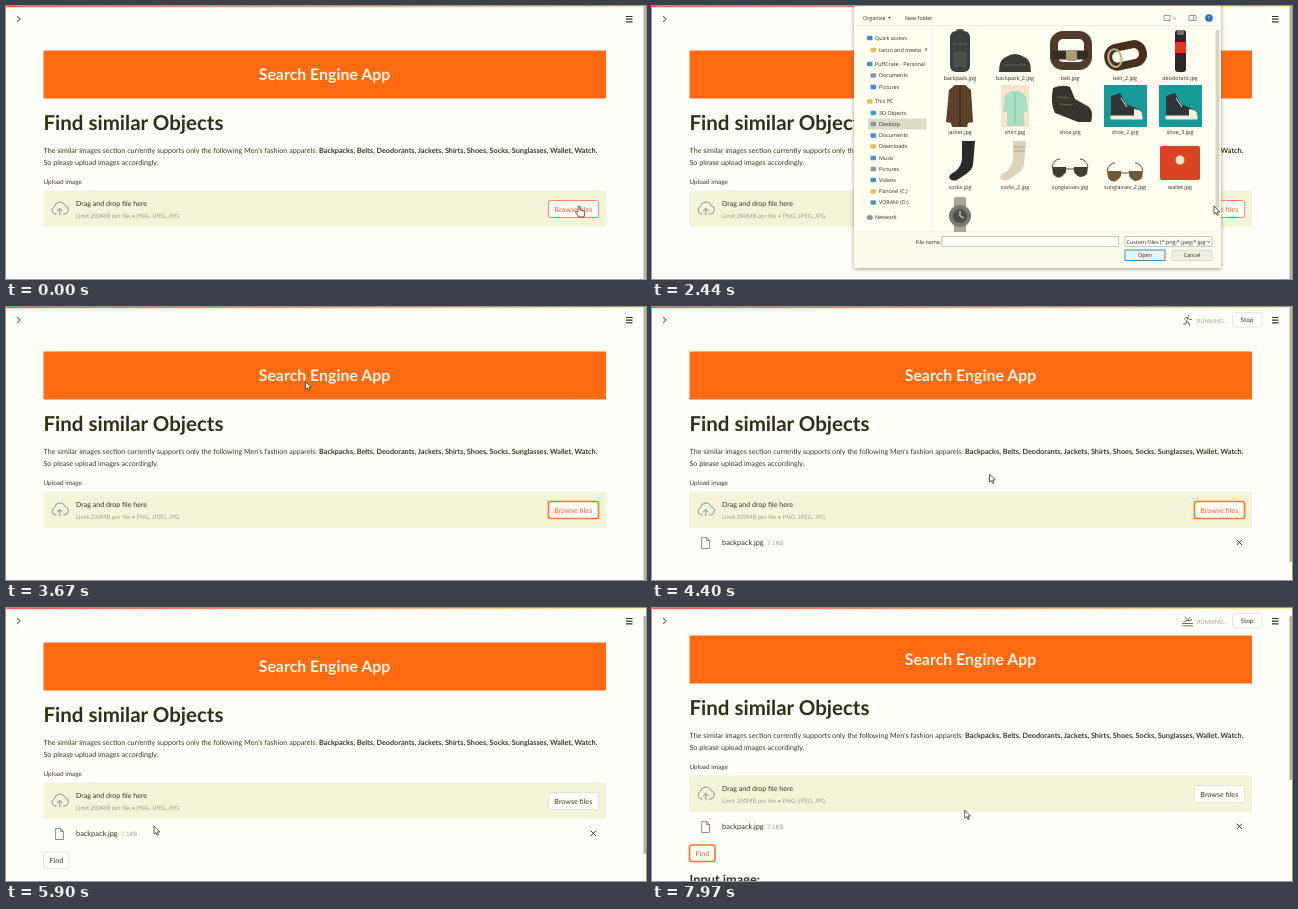
Recreate the animation shown at these times as an HTML page. Size 640 px wide and 273 px high, loop 8000 ms.

```html
<!DOCTYPE html>
<html lang="en">
<head>
<meta charset="utf-8">
<title>Search Engine App</title>
<style>
html, body { margin: 0; height: 100%; overflow: hidden; background: #fffffa; }
svg { display: block; width: 100vw; height: 100vh; }
text { font-family: Lato, sans-serif; font-size: 7.15px; fill: #37381f; text-rendering: geometricPrecision; }
.bold { font-weight: 700; font-size: 7.28px; }
.mid { text-anchor: middle; }
.small { font-size: 6px; fill: #a3a48c; }
.line { fill: none; stroke: #85958f; stroke-width: 1; stroke-linejoin: round; stroke-linecap: round; }
.btn rect { fill: #fffffa; stroke: #e2e2cc; stroke-width: .8; }
.btn.hover rect { stroke: #ff6a4c; }
.btn.focus rect { stroke: #ff7a30; stroke-width: 1.7; }
.btn.hover text, .btn.focus text { fill: #ff5a28; }
.btn.active rect { fill: #ff4b22; stroke: #ff8a5c; stroke-width: 1.6; }
.btn.active text { fill: #fff; }
#dialog text { font: 5.4px "Open Sans", "Noto Sans", sans-serif; fill: #2b2b20; }
.field { fill: #fffffa; stroke: #a9a99a; stroke-width: .6; }
</style>
</head>
<body>
<svg viewBox="0 0 640 273" preserveAspectRatio="none">
  <defs>
    <linearGradient id="strip"><stop stop-color="#ff5a50"/><stop offset=".5" stop-color="#ffa070"/><stop offset="1" stop-color="#fff3a0"/></linearGradient>
    <filter id="shadow" x="-10%" y="-10%" width="120%" height="120%"><feDropShadow dx="0" dy="1" stdDeviation="2" flood-color="#55553a" flood-opacity=".6"/></filter>
  </defs>
  <rect width="640" height="273" fill="#fffffa"/>

  <g id="page">
    <rect x="37.500" y="44.500" width="562.500" height="48" fill="#ff6a13"/>
    <text class="mid" x="318.500" y="74.200" style="font-size:15.9px;font-weight:700;fill:#fff8e6">Search Engine App</text>
    <text class="bold" x="37.500" y="123.500" style="font-size:20.5px;fill:#2f301a">Find similar Objects</text>
    <text x="37.500" y="147">The similar images section currently supports only the following Men's fashion apparels:</text>
    <text class="bold" x="313" y="147">Backpacks, Belts, Deodorants, Jackets, Shirts, Shoes, Socks, Sunglasses, Wallet, Watch.</text>
    <text x="37.500" y="159">So please upload images accordingly.</text>
    <text x="37.500" y="178" style="font-size:6.4px">Upload image</text>
    <rect x="37.500" y="184.500" width="562.500" height="36.800" rx="2" fill="#f3f4da"/>
    <path class="line" d="M50 208h-1a4 4 0 0 1-.5-7.500a5.500 5.500 0 0 1 10.500-1a4.300 4.300 0 0 1-.5 8.500h-1M53.800 209v-6.500m-2.500 2.500l2.500-2.500l2.500 2.500"/>
    <text x="70" y="200.300" style="font-size:7.05px">Drag and drop file here</text>
    <text class="small" x="70" y="212.200">Limit 200MB per file • PNG, JPEG, JPG</text>
    <g id="browse"><rect x="542.500" y="194.500" width="50" height="17" rx="2"/><text class="mid" x="567.300" y="205.600">Browse files</text></g>
    <g id="file">
      <path class="line" d="M50 230.500h4.500l3 3v8h-7.500zM54.500 230.500v3h3"/>
      <text x="70" y="238" style="font-size:7.4px">backpack.jpg</text>
      <text class="small" x="115" y="238">7.1KB</text>
      <path class="line" d="M585 233l4.800 4.800m0-4.800l-4.800 4.800" style="stroke:#37381f"/>
    </g>
    <g id="find"><rect x="37.500" y="254" width="25.500" height="16.500" rx="2"/><text class="mid" x="50.300" y="264.800">Find</text></g>
    <text id="result" class="bold" x="37.500" y="293" style="font-size:12.8px;fill:#2f301a">Input image:</text>
  </g>

  <rect width="640" height="26" fill="#fffffa"/>
  <rect width="640" height="1.200" fill="url(#strip)"/>
  <path class="line" d="M11.500 10.500l2.600 2.500l-2.600 2.500" style="stroke:#77786a;stroke-width:1.200"/>
  <path d="M620 10.500h6.500m-6.500 2.700h6.500m-6.500 2.700h6.500" stroke="#37381f" stroke-width="1.200"/>
  <g id="running">
    <path id="sport" class="line" style="stroke:#6f705c"/>
    <text class="small" x="545" y="16.300" style="font-size:5.600px">RUNNING...</text>
    <g class="btn"><rect x="580.500" y="5.700" width="29.500" height="14.300" rx="2"/><text class="mid" x="595" y="15.300" style="font-size:6.400px">Stop</text></g>
  </g>
  <rect id="thumb" x="637.500" width="2.500" rx="1" fill="#b0b0a4"/>
  <g id="dialog"></g>
  <g id="cursor" stroke="#33332a" stroke-width=".8" fill="#fffffa" stroke-linejoin="round">
    <path id="arrow" d="M0 0v8.200l1.900-1.700l1.300 2.900l1.300-.6l-1.300-2.800h2.600z"/>
    <path id="hand" d="M-1 .5q1-1 2 0v3.500l4 1q1 .3 .8 1.500l-.8 4.500h-5l-3.500-4.500q0-1.500 2.500-.5z"/>
  </g>
</svg>
<script>
const $ = id => document.getElementById(id);
const rect = (x, y, w, h, fill, rx = 0) => `<rect x="${x}" y="${y}" width="${w}" height="${h}" rx="${rx}" fill="${fill}"/>`;
const path = (d, fill, stroke = 'none', width = 1) => `<path d="${d}" fill="${fill}" stroke="${stroke}" stroke-width="${width}"/>`;
const label = (x, y, s, cls = '') => `<text x="${x}" y="${y}" class="${cls}">${s}</text>`;
const ring = (x, y, w, h, stroke, width) =>
  `<rect x="${x}" y="${y}" width="${w}" height="${h}" rx="9" fill="none" stroke="${stroke}" stroke-width="${width}"/>`;

// Thumbnails are drawn around their own centre.
const sneaker = rect(-21, -21, 43, 42, '#159a98') +
  path('M-14 -10l9 -3l6 11l12 5q5 2 4 7h-31z', '#30353a') + path('M-14 10h31v3h-31zM-4 -8l6 9', '#f2f0dc', '#f2f0dc') +
  path('M9 3l5 1q4 2 3 6h-8z', '#f2f0dc');
const glasses = (y, fill) =>
  path(`M-18 ${y}h14v5q-7 10-13 2zM4 ${y}h14l-1 7q-7 7-13-2z`, fill) + path(`M-18 ${y}q2-8 8-8M18 ${y}q-2-8-8-8M-4 ${y + 2}h8`, 'none', '#55503c');
const sock = fill => path('M-2 -20h13l-2 24q-1 5-7 9l-9 6q-6 2-8-3q1-3 7-6q6-6 6-13z', fill);
const items = [
  ['backpack', rect(-4, -22, 8, 5, '#555850', 2) + rect(-10, -20, 20, 41, '#3c403c', 6) + rect(-7, 1, 14, 15, '#4c504a', 3) + path('M-7 -7h14', 'none', '#66675a')],
  ['backpack_2', path('M-16 21q0-13 7-15q9-6 18 0q7 2 7 15z', '#3b3d36') + path('M-10 14h21', 'none', '#66644f')],
  ['belt', ring(-16, -16, 34, 31, '#4e3b2b', 8) + path('M-18 4h36', 'none', '#392c22', 9) + rect(-4, -1, 11, 11, '#a99c7c', 2)],
  ['belt_2', `<g transform="rotate(-12 0 4)">${ring(-17, -5, 35, 19, '#49301d', 8) + ring(-17, -4, 13, 18, '#c0b38a', 2)}</g>`],
  ['deodorant', rect(-5, -21, 11, 42, '#2b2928', 3) + rect(-5, -9, 11, 11, '#d83a22') + rect(-3, -21, 7, 5, '#77736a', 1)],
  ['jacket', path('M-5 -21h10l6 5l2 32l-5 1l-1 4h-15l-1-4l-5-1l3-32z', '#5d4229') + path('M0 -20v40', 'none', '#36271b')],
  ['shirt', rect(-14, -21, 28, 42, '#f6e4cb') + path('M-4 -15h8l7 5l2 16h-4v14h-17v-14h-4l2-16z', '#a9dfc2') + path('M0 -14v33', 'none', '#79b99a', .7)],
  ['shoe', path('M-17 -18q9-4 17-1l5 12l14 8q5 5 2 15h-13l-23-9q-5-9-2-25z', '#37342c') + path('M-13 -9l12 1m-10 6l14 1', 'none', '#66604e')],
  ['shoe_2', sneaker],
  ['shoe_3', sneaker],
  ['socks', `<g transform="translate(4)">${sock('#292b29')}</g>`],
  ['socks_2', sock('#d9d4bb') + path('M-1 -14h11m-11 4h11', 'none', '#aaa58c')],
  ['sunglasses', glasses(6, '#3f3c30')],
  ['sunglasses_2', glasses(10, '#6d5a3c')],
  ['wallet', rect(-20, -15, 40, 34, '#d94322', 2) + `<circle cx="0" cy="-1" r="4.500" fill="#f2e5cd"/>`],
  ['watch', rect(-6, -19, 12, 40, '#a4a598', 2) + `<circle r="11" fill="#77796e"/><circle r="7" fill="#4c504c"/>` + path('M0 -5v5l4 2', 'none', '#eeeedd')],
];
const places = [
  ['Quick access', 32], ['tarun and meeta', 44, 1], ['PuffCrate - Personal', 58], ['Documents', 69.5, 1], ['Pictures', 81, 1],
  ['This PC', 95.5], ['3D Objects', 107, 1], ['Desktop', 118, 1], ['Documents', 129.5, 1], ['Downloads', 140.5, 1], ['Music', 152, 1],
  ['Pictures', 163, 1], ['Videos', 174, 1], ['Panorel (C:)', 185.5, 1], ['VORANI (D:)', 196.5, 1], ['Network', 211.5],
];
const placeColors = ['#3c8ed0', '#e6bf55', '#4b9bb5', '#8a96a0'];

$('dialog').innerHTML = `<g filter="url(#shadow)">${rect(202, -6, 367, 268, '#fffff2')}</g>` +
  label(211, 13.5, 'Organise') + path('M236 11h3l-1.500 1.700z', '#555544') + label(253, 13.5, 'New folder') +
  path('M512 9.500h6v5h-6zm9 2l1.500 1.700l1.500-1.700M537 9.500h7v5h-7zm4.500 0v5', 'none', '#668aa0', .8) +
  `<circle cx="557" cy="12" r="3.800" fill="#1f72b8"/><text x="557" y="14" class="mid" style="fill:#fff">?</text>` +
  path('M203 19.500h365M280 20v206M203 226h365', 'none', '#e9e9d9', .7) +
  rect(216, 112.5, 58.5, 11, '#dcdccb') +
  places.map(([name, y, sub], i) =>
    rect(sub ? 218.5 : 215, y - 2.3, 5.5, 4.6, placeColors[i % 4], 1) + label(sub ? 227 : 223, y + 1.9, name)).join('') +
  path('M273 42l2 3m0-3l-2 3', 'none', '#77786a', .7) +
  `<rect id="selected" x="284" y="22" width="48.500" height="54" fill="#d5eaf5" stroke="#a5d0e8" stroke-width=".6"/>` +
  items.map(([name, art], i) => {
    const x = 308 + i % 5 * 55, row = Math.floor(i / 5);
    return `<g transform="translate(${x} ${45 + row * 55})">${art}</g>` + label(x, 73.5 + row * 54.7, name + '.jpg', 'mid');
  }).join('') +
  rect(202.5, 226, 366, 35.5, '#fcfcec') + rect(563.5, 24, 4, 178, '#d6d6c8') +
  label(263.5, 237.5, 'File name:') +
  `<rect class="field" x="290" y="230.500" width="176.500" height="10"/><rect class="field" x="473" y="230.500" width="87" height="10"/>` +
  `<text id="filename" x="291.500" y="237.500">backpack.jpg</text>` + label(474.5, 237.5, 'Custom Files (*.png;*.jpeg;*.jpg') +
  path('M555 235l1.500 1.700l1.500-1.700', 'none', '#555544', .7) +
  `<rect class="field" x="473" y="244" width="40" height="10.500" style="fill:#eff3ec;stroke:#3b8fc8;stroke-width:1"/>` +
  `<rect class="field" x="520" y="244" width="40" height="10.500" style="fill:#f0f0e2;stroke:#c9c9ba"/>` +
  label(493, 251.2, 'Open', 'mid') + label(540, 251.2, 'Cancel', 'mid');

const sports = [
  'M536.500 8.300v.6M536 10.500l-1.500 4l2.500 1.500l.5 2.500M534.500 14.500l-.5 2.500h-2.500M532 12.500l2-2h2l1.500 2h2',
  'M533 15.500a1.500 1.500 0 1 0 .1 0M539 15.500a1.500 1.500 0 1 0 .1 0M533 16.500l2-3.500l2.500 1.500M535 13l2-2.500l2 1.500M538 8.500v.5',
  'M530.500 15.500h10M531 17.800h9.500M533 9l2.500 3.500h3M538.500 9.500l-3 3l-3.500 1M539.500 11.500v.5',
];

const clamp = v => Math.min(1, Math.max(0, v));
const ramp = (t, a, b) => clamp((t - a) / (b - a));
const smooth = u => u * u * (3 - 2 * u);
const between = (t, a, b) => t >= a && t < b;
const show = (id, on) => $(id).style.display = on ? '' : 'none';

// time, x, y of the pointer tip
const track = [
  [0, 573, 200], [70, 573, 200], [300, 562, 200], [2640, 562, 200], [3230, 294, 61], [3480, 294, 61],
  [4340, 337.5, 167], [4600, 337.5, 167], [5900, 148, 218], [6350, 50, 249], [6600, 50, 249], [7000, 198, 225], [8000, 313, 202],
];
function pointer(t) {
  const i = track.findIndex(k => k[0] > t), [t0, x0, y0] = track[i - 1], [t1, x1, y1] = track[i];
  const u = smooth(ramp(t, t0, t1));
  return [x0 + (x1 - x0) * u, y0 + (y1 - y0) * u];
}

function draw() {
  const t = performance.now() % 8000;
  const scroll = 10 * smooth(ramp(t, 5050, 5350)) + 7 * ramp(t, 7700, 7970);
  $('page').setAttribute('transform', `translate(0 ${-scroll})`);
  show('file', t >= 3950);
  show('find', t >= 4900);
  show('result', t >= 7700);

  const browse = between(t, 1370, 1540) ? 'active' : t < 3600 ? 'hover' : t < 5000 ? 'focus' : '';
  const find = t < 6300 ? '' : t < 6450 ? 'hover' : t < 6560 ? 'active' : 'focus';
  $('browse').setAttribute('class', 'btn ' + browse);
  $('find').setAttribute('class', 'btn ' + find);

  const start = t < 6000 ? 4100 : 6800;
  const running = between(t, 4100, 4900) || t >= 6800;
  show('running', running);
  if (running) {
    $('running').style.opacity = ramp(t, start, start + 300);
    $('sport').setAttribute('d', sports[Math.floor((t - start) / 500) % 3]);
  }

  const thumbEnd = t < 3950 ? 273 : t < 4900 ? 255 : t < 7700 ? 246 : 172;
  const thumbTop = Math.min(8, scroll * .8);
  $('thumb').setAttribute('y', thumbTop);
  $('thumb').setAttribute('height', thumbEnd - thumbTop);

  $('dialog').style.opacity = ramp(t, 1820, 1980) * (1 - ramp(t, 3360, 3540));
  show('dialog', between(t, 1820, 3540));
  show('selected', t >= 3230);
  show('filename', t >= 3290);

  const hand = t < 1820 || between(t, 6290, 6660);
  show('hand', hand);
  show('arrow', !hand);
  $('cursor').setAttribute('transform', `translate(${pointer(t)})`);
  requestAnimationFrame(draw);
}
draw();
</script>
</body>
</html>
```
